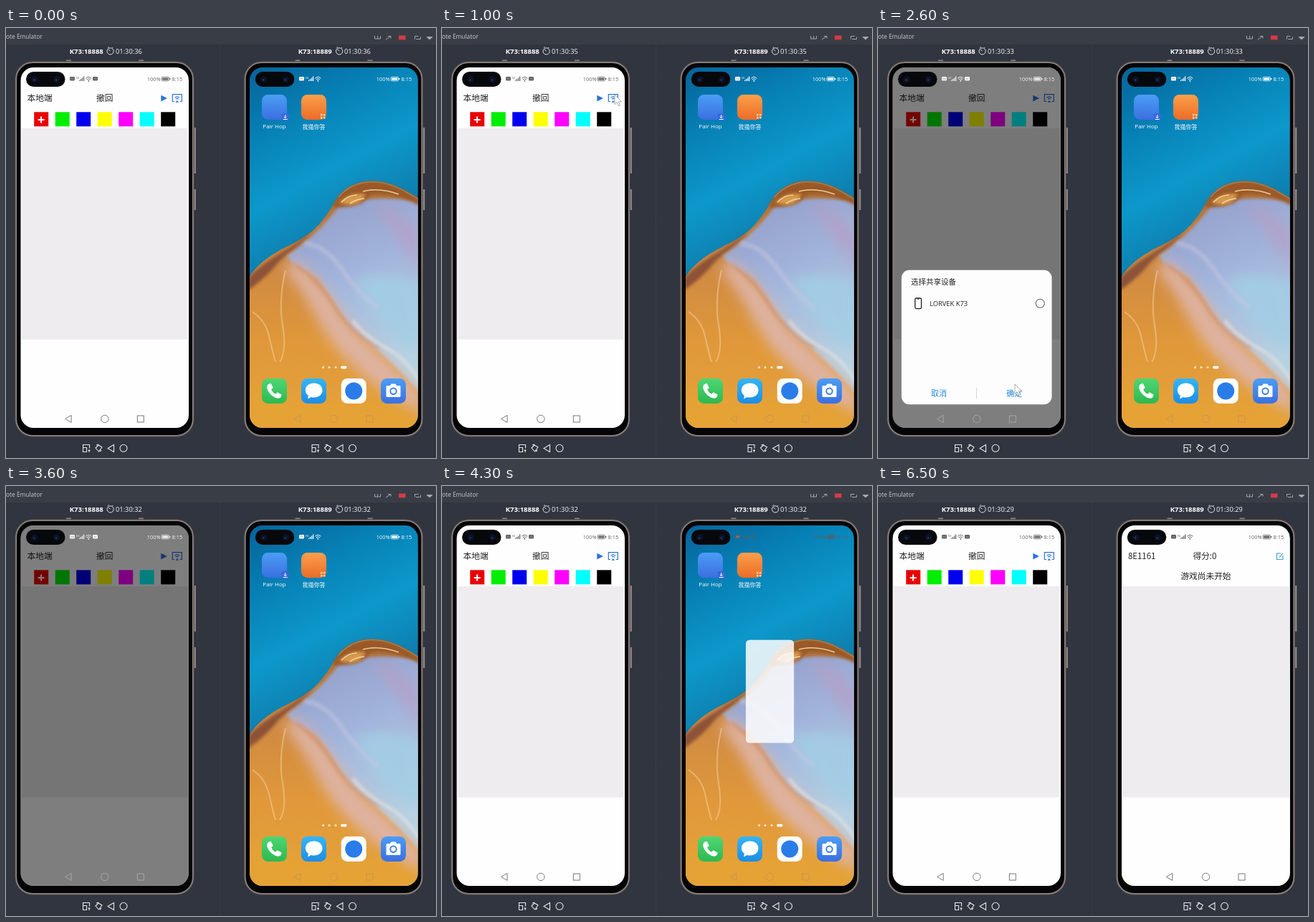
Write an HTML page that moves like this. It is 600 px wide and 600 px high and loops after 7.1 s.

```html
<!DOCTYPE html>
<html lang="zh">
<head>
<meta charset="utf-8">
<title>Remote Emulator</title>
<style>
  html, body { margin: 0; height: 100%; overflow: hidden; background: #30353f; }
  svg { display: block; width: 100vw; height: 100vh; }
  text { font-family: "Noto Sans CJK SC", "Noto Sans CJK", "Noto Sans", sans-serif; }
  .ui { font-family: "Open Sans", "Noto Sans", sans-serif; }
  .mid { text-anchor: middle; }
  .line { fill: none; stroke: currentColor; }
  .soft { filter: url(#blur); }
  .mist { filter: url(#blurMore); }
</style>
</head>
<body>
<svg viewBox="0 0 600 600">
  <defs>
    <filter id="blur" x="-30%" y="-30%" width="160%" height="160%"><feGaussianBlur stdDeviation="2.2"/></filter>
    <filter id="blurMore" x="-50%" y="-50%" width="200%" height="200%"><feGaussianBlur stdDeviation="9"/></filter>
    <clipPath id="screen"><rect x="20.5" y="55" width="234.500" height="503" rx="18"/></clipPath>
    <clipPath id="screenR"><rect x="340" y="55" width="234.800" height="503" rx="18"/></clipPath>
    <linearGradient id="sky" x1="0" y1="0" x2=".25" y2="1">
      <stop offset="0" stop-color="#07639a"/><stop offset=".2" stop-color="#0782b6"/>
      <stop offset=".38" stop-color="#0d98cb"/><stop offset=".58" stop-color="#0e7cab"/>
    </linearGradient>
    <linearGradient id="sand" x1="0" y1="0" x2="0" y2="1">
      <stop offset="0" stop-color="#a8682e"/><stop offset=".35" stop-color="#cf8a42"/>
      <stop offset=".65" stop-color="#e0983a"/><stop offset="1" stop-color="#e5a33a"/>
    </linearGradient>
    <linearGradient id="silk" x1="0" y1="0" x2=".35" y2="1">
      <stop offset="0" stop-color="#8f9ac6"/><stop offset=".5" stop-color="#a3b5dc"/><stop offset="1" stop-color="#b8d2e2"/>
    </linearGradient>
    <linearGradient id="blueTile" x1="0" y1="0" x2="0" y2="1"><stop offset="0" stop-color="#4b9df5"/><stop offset="1" stop-color="#3b6fe0"/></linearGradient>
    <linearGradient id="orangeTile" x1="0" y1="0" x2="0" y2="1"><stop offset="0" stop-color="#fba04a"/><stop offset="1" stop-color="#ec6c28"/></linearGradient>
    <linearGradient id="greenTile" x1="0" y1="0" x2="0" y2="1"><stop offset="0" stop-color="#4fd673"/><stop offset="1" stop-color="#2cb950"/></linearGradient>
    <linearGradient id="cyanTile" x1="0" y1="0" x2="0" y2="1"><stop offset="0" stop-color="#35b6f4"/><stop offset="1" stop-color="#1c8de6"/></linearGradient>

    <g id="body">
      <path d="M84 45.500h7M185 45.500h7" stroke="#8d8381" stroke-width="1.800"/>
      <path d="M263.500 139v64M263.500 225v29" stroke="#9a8e8b" stroke-width="2.600"/>
      <rect x="12.300" y="46.200" width="250.400" height="524.600" rx="25" fill="#4b4746"/>
      <rect x="14.200" y="48.100" width="246.600" height="520.800" rx="23" fill="#050507" stroke="#8c8281" stroke-width="1.800"/>
    </g>
    <g id="lens">
      <rect x="28" y="61" width="54.500" height="21" rx="10.500" fill="#07080c"/>
      <g fill="#0c1226"><circle cx="40" cy="71.800" r="4.600"/><circle cx="70.500" cy="71.800" r="4.600"/></g>
      <g fill="#213a78"><circle cx="39.400" cy="72.500" r="1.200"/><circle cx="70" cy="72.500" r="1.200"/></g>
    </g>
    <g id="status" fill="currentColor">
      <rect x="89" y="68" width="7" height="5.600" rx="1.400"/>
      <path d="M91 69.400v2.800M94 69.400v2.800M91 70.800h3" stroke="#999" stroke-width=".6"/>
      <text x="97.500" y="70.600" font-size="4">5G</text>
      <path d="M102 74v-1.600h1.200V74zM104 74v-3h1.200v3zM106 74v-4.600h1.200V74zM108 74v-6.400h1.200V74z"/>
      <path class="line" d="M111.300 70.200q4-3.600 8 0M112.800 71.900q2.500-2.200 5 0"/><circle cx="115.300" cy="73.700" r="1"/>
      <text class="ui" x="196.800" y="73.900" font-size="7.400">100%</text>
      <rect class="line" x="217" y="68.400" width="10.600" height="5.400" rx="1.400" stroke-width=".8"/>
      <rect x="218.200" y="69.600" width="8.200" height="3"/><rect x="228.200" y="70" width="1.200" height="2.200"/>
      <text class="ui" x="231.600" y="73.900" font-size="7.400">8:15</text>
    </g>
    <g id="nav" class="line" stroke-width="1">
      <path d="M82.500 545.400l8.600-5v10z"/><circle cx="137.800" cy="545.400" r="5.200"/><rect x="183.300" y="541" width="9" height="9"/>
    </g>
    <g id="tools" class="line" stroke-width="1.100">
      <path d="M107.500 587v-5.500h9v5M107.500 585.500h5v6h-5zM114.500 589.500h3M116 588v4"/>
      <path d="M125 586l4-4 5 3-4.500 6zM126 582l3-1M133 589l-2 2"/>
      <path d="M142 586.500l8.500-5v10z"/><circle cx="164" cy="586.300" r="5"/>
    </g>
    <g id="clock" class="line" stroke-width="1">
      <circle cx="145.600" cy="32.400" r="4.600"/><path d="M142.800 29.600l2.800 2.800M142 27.500l1.500-1M149.300 28l-1-1"/>
    </g>
  </defs>

  <rect width="600" height="600" fill="#30353f"/>
  <rect width="600" height="23" fill="#393d45"/>
  <text class="ui" x="0" y="15" font-size="8.400" fill="#c9cbce">ote Emulator</text>
  <g class="line" color="#a4a7ad" stroke-width="1">
    <path d="M514.500 11v4h8v-4M518.500 11v4M530 16l6-4M533 11.500h4v3M570.500 15.500v-4h5M572 15.500h6.500v-3"/>
    <path d="M587 12.500h8l-4 3.500z" fill="currentColor"/>
  </g>
  <rect x="548" y="10.500" width="9.500" height="5.800" fill="#d83a48"/>
  <path d="M298.700 23v577" stroke="#4a4e56" stroke-dasharray="1 2"/>

  <g color="#e6e7e9">
    <use href="#clock"/><use href="#clock" x="319.500"/>
    <use href="#tools"/><use href="#tools" x="319.500"/>
  </g>
  <g fill="#fff" font-size="9.500">
    <text class="ui mid" x="112.300" y="35.700" font-weight="700">K73:18888</text>
    <text class="ui mid" x="431.300" y="35.700" font-weight="700">K73:18889</text>
    <text class="ui timer" x="153" y="35.700" font-size="9.300"></text>
    <text class="ui timer" x="472" y="35.700" font-size="9.300"></text>
  </g>
  <use href="#body"/><use href="#body" x="319.500"/>

  <g clip-path="url(#screen)">
    <rect x="20" y="55" width="236" height="503" fill="#fefefe"/>
    <rect x="22" y="140" width="231.500" height="294.500" fill="#eeecee"/>
    <g font-size="11.700" fill="#222"><text x="29.500" y="102.300">本地端</text><text x="126" y="102.300">撤回</text></g>
    <path d="M216.300 93.800l8.600 4.300-8.600 4.300z" fill="#2a72dc"/>
    <g class="line" color="#2a72dc" stroke-width="1.200">
      <path d="M235 102.500h-2.700v-9.800h13v9.800h-2.700M235.500 97.200q3.300-2.800 6.600 0M237 99.200q1.800-1.500 3.600 0"/>
      <path d="M236.500 103.800l2.300-2.800 2.300 2.800z" fill="currentColor" stroke="none"/>
    </g>
    <g id="swatches"></g>
    <path d="M44.600 127.900h9M49.100 123.400v9" stroke="#fff" stroke-width="2"/>
    <rect id="dim" x="20" y="55" width="236" height="503"/>
    <use id="navL" href="#nav"/>
    <g id="dialog">
      <rect x="32.800" y="337.800" width="209.700" height="187.500" rx="11" fill="#fefdfe"/>
      <text x="46" y="358.200" font-size="10.500" fill="#222">选择共享设备</text>
      <rect x="51.700" y="377" width="8.800" height="14.600" rx="1.800" fill="none" stroke="#222" stroke-width="1.300"/>
      <path d="M54.500 378h3" stroke="#222"/>
      <text class="ui" x="72" y="388.300" font-size="9.400" fill="#222">LORVEK K73</text>
      <circle cx="226.200" cy="384.300" r="6" fill="none" stroke="#666" stroke-width="1.100"/>
      <g class="mid" font-size="11" fill="#2088d2"><text x="85" y="513.800">取消</text><text x="190.200" y="513.800">确定</text></g>
      <path d="M137.500 501.500v16" stroke="#d8d8d8"/>
    </g>
    <g id="statusL">
      <use href="#status"/>
      <rect x="121" y="68" width="7" height="5.600" rx="1.400" fill="currentColor"/><path d="M122.800 70.800h3.400" stroke="#999" stroke-width=".8"/>
    </g>
  </g>
  <use href="#lens"/>

  <g clip-path="url(#screenR)">
    <g id="home">
      <rect x="340" y="55" width="235" height="503" fill="url(#sky)"/>
      <path d="M340 347C350 330 368 318 384 309C404 299 418 292 430 281C446 266 455 248 464 236C474 224 488 217 504 215C532 212 556 227 576 239V560H340Z" fill="url(#sand)"/>
      <path class="soft" d="M338 349C362 322 400 308 428 284C414 304 390 314 376 332C364 346 352 356 338 366Z" fill="#7d4436" opacity=".8"/>
      <path class="soft" d="M392 318C424 296 450 270 466 246C500 236 540 236 580 242V512C556 486 524 452 494 430C472 412 458 380 436 352C424 338 400 336 392 318Z" fill="url(#silk)"/>
      <path class="mist" d="M398 322C430 338 452 372 474 404C500 440 545 470 580 510V540C530 512 490 480 462 448C434 414 420 370 390 340Z" fill="#deb2a0"/>
      <path class="mist" d="M486 350Q530 338 580 356V452Q520 424 486 350Z" fill="#a2cde4" opacity=".9"/>
      <path class="mist" d="M510 244Q552 250 580 290V340Q545 290 510 244Z" fill="#b59fc6" opacity=".75"/>
      <path class="soft" d="M416 300Q446 304 468 336T520 392" fill="none" stroke="#c4c6e2" stroke-width="6" opacity=".55"/>
      <path class="soft" d="M404 330Q436 352 458 388T520 446" fill="none" stroke="#c98f74" stroke-width="4" opacity=".6"/>
      <path class="soft" d="M484 408Q500 430 530 446T580 498" fill="none" stroke="#e4e2e2" stroke-width="4" opacity=".8"/>
      <path class="mist" d="M338 500Q420 520 480 520T580 556V575H338Z" fill="#e5a236"/>
      <path class="soft" d="M456 250C464 228 486 215 506 215C534 212 558 228 580 242V249C552 234 526 228 508 232C498 250 476 250 456 250Z" fill="#9a5826"/>
      <path class="soft" d="M464 244Q480 228 502 232Q496 246 480 247Z" fill="#d79a4c"/>
      <path d="M468 243q10-10 22-10M480 245q8-6 20-7M498 228q22-6 50 4" fill="none" stroke="#f7dfae" stroke-width="1.600" opacity=".85"/>
      <path d="M464 236C474 224 488 217 504 215C532 212 556 227 576 239" fill="none" stroke="#b97a42" stroke-width="1.400"/>
      <path d="M344 396Q362 408 367 430T376 466M390 338Q380 380 386 415T382 466" fill="none" stroke="#f3cf9a" stroke-width="2" opacity=".55"/>

      <rect x="357" y="93" width="35" height="35" rx="8.500" fill="url(#blueTile)"/>
      <rect x="384.500" y="119" width="10.500" height="10.500" rx="3" fill="#3269dc"/>
      <path class="line" color="#fff" d="M389.700 121v4.500M387.700 123.700l2 2 2-2M386.700 127.500h6"/>
      <rect x="412" y="93" width="35" height="35" rx="8.500" fill="url(#orangeTile)"/>
      <path d="M439 120h2.500v2.500H439zM443 120h2.500v2.500H443zM439 124h2.500v2.500H439zM443 124h2.500v2.500H443z" fill="#ffd2ad"/>
      <g class="mid" font-size="8" fill="#fff"><text class="ui" x="374.500" y="140.300">Pair Hop</text><text x="429.500" y="140.600">我描你答</text></g>
      <g fill="#fff">
        <g opacity=".75"><circle cx="442.500" cy="473.600" r="1.500"/><circle cx="451" cy="473.600" r="1.500"/><circle cx="460" cy="473.600" r="1.500"/></g>
        <rect x="467" y="471.700" width="8.500" height="3.700" rx="1.800"/>
      </g>
      <rect x="357" y="489" width="35" height="35" rx="8.500" fill="url(#greenTile)"/>
      <path d="M366 497l3.500-1.200 3.300 6.200-2.700 2.600q2 4.200 5.800 6.200l2.900-2.600 6 3.600-1.600 3.600q-3.500 2.600-8.200.2-8-4.300-10.600-12.700-.700-4 1.600-5.900z" fill="#fff"/>
      <rect x="412" y="489" width="35" height="35" rx="8.500" fill="url(#cyanTile)"/>
      <path d="M429.700 495.500c7 0 11.800 4.300 11.800 10s-4.800 10-11.800 10q-2.200 0-4-.6l-4.600 2.600.7-4.800c-2.600-1.800-4-4.300-4-7.200 0-5.700 4.900-10 11.900-10z" fill="#fff"/>
      <rect x="467.700" y="489" width="35" height="35" rx="8.500" fill="#fbfcfe"/>
      <circle cx="485.200" cy="506.500" r="12" fill="#2a7ce8"/>
      <rect x="523" y="489" width="35" height="35" rx="8.500" fill="url(#blueTile)"/>
      <path d="M530.500 500.500q0-1.500 1.500-1.500h4l1.500-2.500h6l1.500 2.500h4q1.500 0 1.500 1.500v13q0 1.500-1.500 1.500h-17q-1.500 0-1.500-1.500z" fill="#fff"/>
      <circle cx="540.500" cy="506.800" r="4.200" fill="none" stroke="#4380e6" stroke-width="2"/>
    </g>
    <g id="app">
      <rect x="340" y="55" width="235" height="503" rx="18" fill="#fefefe"/>
      <g id="page">
        <rect x="341.500" y="140" width="233" height="294.500" fill="#eeecee"/>
        <g font-size="11.700" fill="#222">
          <text x="349" y="102.300" font-size="11.400">8E1161</text>
          <text class="mid" x="456" y="102.300">得分:0</text>
          <text class="mid" x="457.500" y="130.300">游戏尚未开始</text>
        </g>
        <path d="M562 94h-5.500v8.500h8.500v-5.500M560 99.500l5-5.500" fill="none" stroke="#35a0d8" stroke-width="1.100"/>
      </g>
    </g>
    <g id="statusR"><use href="#status" x="320"/></g>
    <use id="navR" href="#nav" x="319.700"/>
  </g>
  <use href="#lens" x="319.800"/>

  <path id="cursor" d="M0 0v13.500l3.100-2.800 2.300 5.100 2.200-1-2.300-4.900h4.200z" fill="#fff" stroke="#8a8a8a" stroke-width=".7"/>
</svg>
<script>
  const LOOP = 7100, STEP = 100;
  const $ = id => document.getElementById(id);
  const show = (el, on) => { el.style.display = on ? "" : "none"; };
  const timers = document.querySelectorAll(".timer");

  $("swatches").innerHTML = ["#e90000", "#00ee00", "#0000ee", "#ffff00", "#ff00ff", "#00ffff", "#000"]
    .map((c, i) => `<rect x="${39.2 + 29.5 * i}" y="117.300" width="20" height="20" fill="${c}"/>`).join("");

  // Keys are [time, ...values]; returns the values at time t.
  function track(keys, t) {
    const i = keys.findIndex(k => k[0] > t);
    if (i === 0) return keys[0].slice(1);
    if (i < 0) return keys[keys.length - 1].slice(1);
    const a = keys[i - 1], b = keys[i], p = (t - a[0]) / (b[0] - a[0]);
    return a.slice(1).map((v, n) => v + (b[n + 1] - v) * p);
  }

  const pointer = [[600, 262, 175], [900, 241, 93], [1500, 241, 93], [1700, 205, 265], [2400, 191, 497]];
  const shade = [[1500, 0], [1700, .36], [1900, .5], [3800, .5], [4100, 0]];
  const sheet = [[1400, 222], [1600, 0], [2900, 0], [3200, 222]];
  // Scale, centre y and opacity of the opening window.
  const launch = [[4200, .12, 282, .5], [4300, .286, 286.6, .85], [4400, .6, 296, .93], [4500, .84, 302, 1], [4700, 1, 306.5, 1]];

  function draw(t) {
    const left = 36 - Math.floor((t + 600) / 1000);
    timers.forEach(el => { el.textContent = "01:30:" + left; });

    const [alpha] = track(shade, t);
    $("dim").setAttribute("opacity", alpha);
    $("statusL").style.color = alpha > .2 ? "#f4f4f4" : "#666";
    $("navL").style.color = alpha > .2 ? "#a6a6a6" : "#777";

    const [drop] = track(sheet, t);
    show($("dialog"), drop < 222);
    $("dialog").setAttribute("transform", `translate(0 ${drop})`);

    const [x, y] = track(pointer, t);
    show($("cursor"), t >= 600 && t < 3100);
    $("cursor").setAttribute("transform", `translate(${x} ${y})`);

    const [scale, cy, opacity] = track(launch, t);
    show($("app"), t >= 4200);
    $("app").setAttribute("transform", `translate(457.5 ${cy}) scale(${scale}) translate(-457.5 -306.5)`);
    $("app").setAttribute("opacity", opacity);
    show($("page"), t >= 4900);
    $("statusR").style.color = t >= 4200 ? "#5a5f64" : "#fff";
    $("navR").style.color = t >= 4700 ? "#777" : "rgba(190, 145, 95, .75)";
  }

  const start = performance.now();
  function tick() {
    const t = (performance.now() - start) % LOOP;
    draw(Math.floor(t / STEP) * STEP);
    requestAnimationFrame(tick);
  }
  tick();
</script>
</body>
</html>
```
